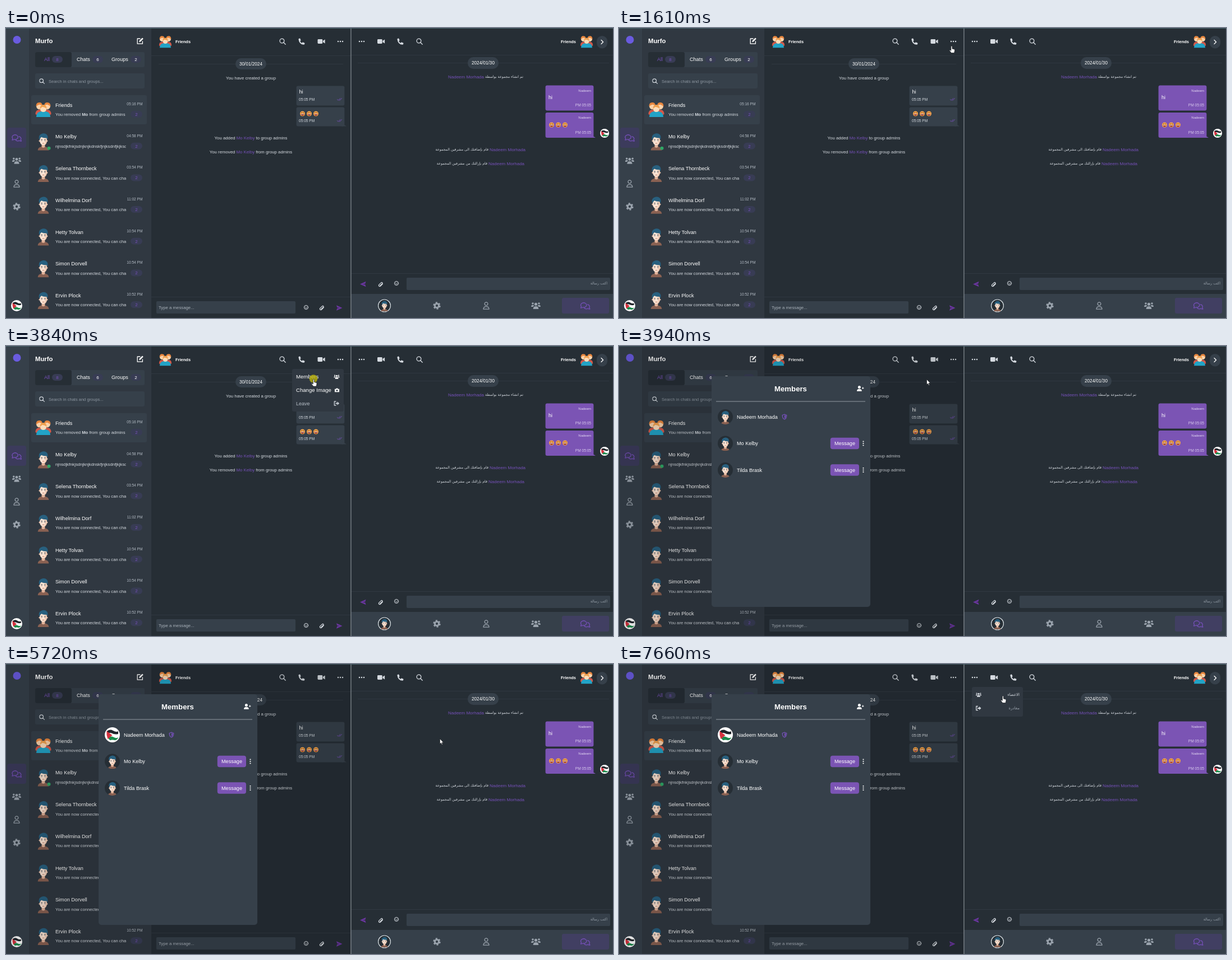
An HTML page for the animation above (8 s loop, 1082 by 518 pixels).

```html
<!DOCTYPE html>
<html lang="en">
<head>
<meta charset="utf-8">
<title>Chat windows</title>
<style>
html, body { margin: 0; width: 100%; height: 100%; overflow: hidden; background: #262e35; }
svg { display: block; width: 100vw; height: 100vh; font-family: "Liberation Sans", sans-serif; }
.arabic { direction: rtl; font-family: "DejaVu Sans", sans-serif; }
.line { fill: none; stroke: currentColor; stroke-width: 1.3; stroke-linejoin: round; stroke-linecap: round; }
.solid { fill: currentColor; }
</style>
</head>
<body>
<svg id="stage" viewBox="0 0 1082 518" preserveAspectRatio="none">
<defs>
  <clipPath id="disc"><circle r="13.5"/></clipPath>
  <clipPath id="preview"><rect x="88" y="100" width="126" height="410"/></clipPath>
  <g id="search" class="line"><circle cx="-1" cy="-1" r="3.9"/><path d="M2 2L5.2 5.2"/></g>
  <path id="phone" class="solid" d="M-5.7-4.6L-3-5.7-1.3-1.9-2.8-.6Q-1.8 1.7.6 2.8L1.9 1.3 5.7 3 4.6 5.7Q-4.6 6-5.7-4.6Z"/>
  <g id="video" class="solid"><rect x="-6.5" y="-4" width="8.7" height="8" rx="1.4"/><path d="M3-1.2L6.6-3.6V3.6L3 1.2Z"/></g>
  <g id="dots" class="solid"><circle cx="-4" r="1.25"/><circle r="1.25"/><circle cx="4" r="1.25"/></g>
  <g id="edit"><path class="line" d="M0-4H-4.8V5.2H4.4V.8"/><path class="solid" d="M-1.8 2.2L-1.2-.5 4-5.6 5.8-3.8.7 1.5Z"/></g>
  <g id="users" class="solid"><circle cy="-2.7" r="2.6"/><circle cx="-5.5" cy="-4" r="1.8"/><circle cx="5.5" cy="-4" r="1.8"/>
    <path d="M-4.8 6Q-4.8 1 0 1T4.8 6ZM-8.4 2Q-8.4-1.2-5.6-1.2T-3.2.3Q-4.6 1-5 2ZM8.4 2Q8.4-1.2 5.6-1.2T3.2.3Q4.6 1 5 2Z"/></g>
  <g id="user" class="line"><circle cy="-3.3" r="2.9"/><path d="M-5 6.2Q-5 1.6 0 1.6T5 6.2Z"/></g>
  <g id="gear" fill="none" stroke="currentColor"><circle r="3.6" stroke-width="2.9"/><circle r="5.6" stroke-width="2.2" stroke-dasharray="3.1 2.764"/></g>
  <g id="chats" class="line"><path d="M-8 4L-6.9 1.6A5.2 4.2 0 1 1-4.3 3Q-5.9 4-8 4ZM4-2.2A4.8 3.9 0 0 1 7.2 3.6L8.4 6Q6.2 6 4.8 5.2A5.2 4.2 0 0 1-1.8 4"/></g>
  <path id="clip" class="line" d="M3.4-1L-.5 3A1.8 1.8 0 0 1-3 .4L1-3.4A1.3 1.3 0 0 1 2.8-1.6L-1 2"/>
  <g id="smile"><circle r="3.6" class="line" style="stroke-width:1"/><path class="line" style="stroke-width:.8" d="M-1.7 1Q0 2.4 1.7 1"/><circle cx="-1.3" cy="-1" r=".55" class="solid"/><circle cx="1.3" cy="-1" r=".55" class="solid"/></g>
  <path id="send" class="solid" d="M-5-4.8L5.5 0-5 4.8-3.8.8 1 0-3.8-.8Z"/>
  <path id="check" class="line" style="stroke-width:.9" d="M-4 0L-2.3 1.8 1.4-2M-.5 1L.4 1.8 4-2"/>
  <g id="exit"><path class="line" d="M-1.6-3.5H-4.2V3.5H-1.6"/><path class="solid" d="M-2-1H1V-3.2L4.6 0 1 3.2V1H-2Z"/></g>
  <g id="camera"><path class="solid" d="M-4.5-2.5H-2L-1.3-3.8H1.3L2-2.5H4.5V3.7H-4.5Z"/><circle cy=".5" r="1.6" fill="#303841"/></g>
  <g id="adduser" class="solid"><circle cx="-1.6" cy="-2.5" r="2.5"/><path d="M-6 4.7Q-6 .7-1.6.7T2.8 4.7ZM3-1.2H4.2V-2.5H5.2V-1.2H6.5V-.2H5.2V1.1H4.2V-.2H3Z"/></g>
  <g id="shield"><path class="line" d="M0-4.3L3.8-3Q3.8 2.8 0 4.5-3.8 2.8-3.8-3Z"/><path class="solid" d="M0-3V3.3Q2.6 1.7 2.6-2.2Z"/></g>
  <g id="emoji"><circle r="4.5" fill="#f5a54a"/><path fill="#8d2a2a" d="M-3 .2H3Q2.5 3.4 0 3.4T-3 .2Z"/><path fill="#fff" d="M-2.6.3H2.6V1.2H-2.6Z"/><circle cx="-1.6" cy="-1.5" r=".8" fill="#5a3020"/><circle cx="1.6" cy="-1.5" r=".8" fill="#5a3020"/></g>
  <g id="man">
    <path fill="#8a6152" d="M-10 16Q-10 11-3.5 9.5H3.5Q10 11 10 16Z"/>
    <path fill="#e2b49b" d="M-3 4H3V10Q0 12.5-3 10Z"/>
    <ellipse cy="-1.5" rx="6.6" ry="8.2" fill="#fbe3d3"/>
    <circle cx="-6.8" cy="-1" r="1.3" fill="#f3cdb5"/><circle cx="6.8" cy="-1" r="1.3" fill="#f3cdb5"/>
    <path fill="#f0cbb4" d="M3-9Q7-8 6.6-1.5 6 6 1.5 6.6 4.5 2 3-9Z"/>
    <path fill="#28607f" d="M-7.4-3Q-9.6-11-4-13.5 2-16.5 6.4-12.5 9.4-9.5 7.4-3L6-6.5Q0-5.5-3.4-8-6-6.5-7.4-3Z"/>
    <path stroke="#33404d" stroke-width="1" fill="none" d="M-4.2-3.4H-1.6M1.6-3.4H4.2"/>
    <circle cx="-2.8" cy="-1.4" r=".7" fill="#33404d"/><circle cx="2.8" cy="-1.4" r=".7" fill="#33404d"/>
    <path stroke="#b5694f" stroke-width=".9" fill="none" d="M-1.6 3.3H1.6"/>
  </g>
  <g id="trio">
    <path fill="#d4594a" d="M-14 9Q-14 1-7 1H7Q14 1 14 9L10 11H-10Z"/>
    <circle cx="-7" cy="-5" r="5.4" fill="#fbd3ab"/><circle cx="7" cy="-5" r="5.4" fill="#fbd3ab"/>
    <path fill="#e8873f" d="M-13-5Q-13-13-6-12-2-12-1.6-6-6-9-8-8ZM13-5Q13-13 6-12 2-12 1.6-6 6-9 8-8Z"/>
    <path fill="#22a3c6" d="M-12.5 14Q-12.5 5-4 4H4Q12.5 5 12.5 14Z"/>
    <circle cy="-.5" r="5.6" fill="#fddcb9"/>
    <path fill="#f0a150" d="M-6-.5Q-6-8 0-8T6-.5Q3-3.8-2-4Z"/>
  </g>
  <g id="flag">
    <circle r="10" fill="#fff"/>
    <path fill="#20242a" d="M-7-5Q-3-8 1-5.6T7.8-4.6V-1.2Q3 0-1-2.2-4-3.5-7-1Z"/>
    <path fill="#198a4a" d="M-6 4Q-2 1 1.5 3T8 3.6Q6.5 7 3.5 7.2 0 6-3 7.2Z"/>
    <path fill="#d5323e" d="M-7.5-5L0 .6-6 5.5Q-8 0-7.5-5Z"/>
  </g>
</defs>
</svg>
<script>
const DARK = '#262e35', MID = '#303841', LIGHT = '#36404a';
const WHITE = '#fff', SOFT = '#d5dae0', GRAY = '#9aa3ad', PURPLE = '#7550b8', FILL = '#7b54b4', TINT = '#413f62';
const FRIEND = 'Mo Kelby', OWNER = 'Nadeem Morhada';
const stage = document.getElementById('stage');

const rect = (x, y, w, h, fill, r = 0, attrs = '') =>
  `<rect x="${x}" y="${y}" width="${w}" height="${h}" rx="${r}" fill="${fill}" ${attrs}/>`;
const circle = (x, y, r, fill) => `<circle cx="${x}" cy="${y}" r="${r}" fill="${fill}"/>`;
// y is the visual middle of the line
const text = (x, y, s, size, fill = WHITE, attrs = '') =>
  `<text x="${x}" y="${y + size * .36}" font-size="${size}" fill="${fill}" ${attrs}>${s}</text>`;
const MIDDLE = 'text-anchor="middle" ', END = 'text-anchor="end" ', BOLD = 'font-weight="bold" ', ARABIC = 'class="arabic" ';
const icon = (id, x, y, color = SOFT, scale = 1, flip = 1) =>
  `<use href="#${id}" transform="translate(${x} ${y}) scale(${scale * flip} ${scale})" color="${color}"/>`;
const hline = (x1, x2, y, color = LIGHT) => rect(x1, y, x2 - x1, 1, color);
const group = (id, content) => `<g id="${id}">${content}</g>`;
const link = s => `<tspan fill="${PURPLE}">${s}</tspan>`;
const portrait = (x, y) => `<g transform="translate(${x} ${y})">${circle(0, 0, 13.5, DARK)}<g clip-path="url(#disc)">${icon('man', 0, 1, WHITE, .78)}</g></g>`;

function sidebar() {
  const chat = ([name, time, preview], i) => {
    const y = 146 + i * 56.7;
    return (i ? icon('man', 66.5, y, WHITE, .98) : rect(45, 120, 206, 52, LIGHT, 3) + icon('trio', 66.5, y - 1, WHITE, 1)) +
      (i === 1 ? circle(76.5, y + 12, 3, '#2fa866') : '') +
      text(88, y - 8.5, name, 9.1) + text(243.5, y - 10.5, time, 6.6, '#b4bcc5', END) +
      text(88, y + 8.5, preview, 7.7, SOFT, 'clip-path="url(#preview)"') +
      rect(222, y + 2, 21, 12, '#383c54', 6) + text(232.5, y + 8, '2', 8, PURPLE, MIDDLE);
  };
  const tab = (x, label, badge, count, color) =>
    text(x, 56, label, 9.1, color) + rect(badge, 50, 19, 12, '#383c54', 6) + text(badge + 9.5, 56, count, 8, color, MIDDLE);
  const connected = 'You are now connected, You can chat';
  const chats = [
    ['Friends', '05:16 PM', 'You removed <tspan font-weight="bold">Mo</tspan> from group admins'],
    [FRIEND, '04:58 PM', 'njnsdjkfnkjsdnjknjkdnskfjnjksdnfjkjksdn'],
    ['Selena Thornbeck', '03:54 PM', connected],
    ['Wilhelmina Dorf', '11:02 PM', connected],
    ['Hetty Tolvan', '10:54 PM', connected],
    ['Simon Dorvell', '10:54 PM', connected],
    ['Ervin Plock', '10:52 PM', connected]];
  return rect(0, 0, 41, 518, LIGHT) + rect(41, 0, 218, 518, MID) +
    circle(19.5, 21, 7, '#6a5be0') + rect(2, 178, 34, 36, '#3c3b5c', 4) + icon('chats', 19, 196, PURPLE) +
    icon('users', 19, 237, GRAY, .95) + icon('user', 19, 278, GRAY) + icon('gear', 19, 319, GRAY) + icon('flag', 19, 496) +
    text(52, 23, 'Murfo', 11.3, WHITE, BOLD) + icon('edit', 239, 23, WHITE) +
    rect(52, 43, 195, 27, LIGHT, 3) + rect(52, 43, 65, 27, DARK, 3) +
    tab(68, 'All', 82, 8, PURPLE) + tab(126, 'Chats', 154, 6, WHITE) + tab(188, 'Groups', 222, 2, WHITE) +
    rect(52, 81, 195, 27, LIGHT, 3) + icon('search', 64, 95, SOFT, .85) + text(76, 95, 'Search in chats and groups...', 7.5, '#8d96a0') +
    chats.map(chat).join('');
}

function bubble(x, y, h, fill, tail) {
  return rect(x - .4, y - .4, 85.8, h + .8, fill, 3) +
    (tail ? `<path d="M${x + 80} ${y + h - 5}L${x + 89} ${y + h + .4}H${x + 80}Z" fill="${fill}"/>` : '');
}
const laughs = (x, y) => [0, 12, 24].map(dx => icon('emoji', x + dx, y)).join('');

function leftChat() {
  const stamp = y => text(522, y, '05:05 PM', 6.6, SOFT) + icon('check', 594.5, y - .5, PURPLE);
  return rect(259, 0, 356, 518, DARK) + icon('trio', 284, 24, WHITE, .8) + text(302, 24, 'Friends', 7.5, WHITE, BOLD) +
    icon('search', 493, 24) + icon('phone', 527, 24) + icon('video', 562, 24) + icon('dots', 596, 24) +
    hline(259, 615, 49, MID) + hline(272, 601, 64, MID) + rect(409, 54, 55, 20, LIGHT, 10) + text(436.5, 64, '30/01/2024', 8.2, WHITE, MIDDLE) +
    text(436.5, 89, 'You have created a group', 7.8, SOFT, MIDDLE) +
    bubble(518, 104, 34, LIGHT) + text(522.5, 114, 'hi', 9) + stamp(128) +
    bubble(518, 142, 33, LIGHT, true) + laughs(528.5, 153) + stamp(166) +
    text(436.5, 196.5, `You added ${link(FRIEND)} to group admins`, 7.8, SOFT, MIDDLE) +
    text(436.5, 221.5, `You removed ${link(FRIEND)} from group admins`, 7.8, SOFT, MIDDLE) +
    hline(259, 615, 480, MID) + rect(268, 488, 248, 22, LIGHT, 2) + text(272, 499, 'Type a message...', 7.8, '#a9b1ba') +
    icon('smile', 535, 499) + icon('clip', 563, 500) + icon('send', 594, 500, '#6b36a0');
}

function rightChat() {
  const stamp = y => text(1043, y, 'PM 05:05', 6.6, '#d9cbee', END);
  const sender = y => text(1043, y, 'Nadeem', 6, '#e3d8f2', END);
  return rect(615, 0, 467, 518, DARK) +
    icon('dots', 634, 24) + icon('video', 668.5, 24) + icon('phone', 703, 24) + icon('search', 737, 24) +
    text(1016, 24.5, 'Friends', 7.5, WHITE, BOLD + END) + icon('trio', 1035, 24, WHITE, .8) + rect(1053, 14, 19, 22.5, LIGHT, 9.5) +
    `<path class="line" color="#fff" d="M1061 21.5L1064.5 25 1061 28.5"/>` +
    hline(615, 1082, 48, MID) + hline(627, 1075, 62, MID) + rect(823, 52, 55, 21, LIGHT, 10) + text(850.5, 62.5, '2024/01/30', 8.2, WHITE, MIDDLE) +
    text(852, 87.5, OWNER, 8, PURPLE, END) + text(854, 87, 'تم انشاء مجموعة بواسطة', 6.3, SOFT, ARABIC + END) +
    bubble(962, 103, 44, FILL) + sender(111.5) + text(967, 124, 'hi', 9) + stamp(138) +
    bubble(962, 151.5, 44, FILL, true) + sender(160) + laughs(972.5, 173) + stamp(187) + icon('flag', 1067, 188, WHITE, .8) +
    text(860, 216.5, 'قام بإضافتك الى مشرفين المجموعة', 6.3, SOFT, ARABIC) + text(862, 217, OWNER, 8, PURPLE) +
    text(858, 241.5, 'قام بإزالتك من مشرفين المجموعة', 6.3, SOFT, ARABIC) + text(860, 242, OWNER, 8, PURPLE) +
    hline(615, 1082, 438, MID) + icon('send', 636.5, 457.5, '#6b36a0', 1, -1) + icon('clip', 668, 458) + icon('smile', 696, 456) +
    rect(714, 446, 363, 22, LIGHT, 2) + text(1072, 456, 'اكتب رسالة', 6.3, GRAY, ARABIC) +
    rect(615, 475, 467, 43, LIGHT) + circle(674.5, 496, 11.5, '#dfe6ea') + circle(674.5, 496, 10.4, DARK) + icon('man', 674.5, 496.5, WHITE, .6) +
    icon('gear', 768, 496, GRAY) + icon('user', 856, 496, GRAY) + icon('users', 944.5, 496, GRAY) +
    rect(991, 482, 84, 28, TINT, 3) + icon('chats', 1032.5, 496, PURPLE);
}

function modal() {
  const member = (y, name) => portrait(189.5, y) + text(210, y, name, 9.1) + rect(376.8, y - 10.3, 51.2, 20.6, FILL, 4) +
    text(402.5, y, 'Message', 9.1, WHITE, MIDDLE) + [-3.5, 0, 3.5].map(d => circle(435.5, y + d, 1.1, WHITE)).join('');
  return rect(0, 0, 614, 518, '#000', 0, 'opacity=".12"') +
    rect(165, 54, 283, 412, LIGHT, 5) + rect(168, 0, 278, 41, MID, 4, 'id="hover"') +
    text(306, 76, 'Members', 13.2, WHITE, BOLD + MIDDLE) + icon('adduser', 430, 76, WHITE) + hline(173, 439, 98.5, '#929aa2') +
    portrait(189.5, 126.5) + group('ownerFlag', icon('flag', 189.5, 126.5, WHITE, 1.35)) +
    text(210, 126.5, OWNER, 9.1) + icon('shield', 295, 126.5, PURPLE) +
    member(174, FRIEND) + member(221.5, 'Tilda Brask');
}

const leftMenu = () => rect(510, 41, 92, 76, MID, 3) +
  text(517, 55, 'Members', 9.7) + icon('users', 589.5, 55, WHITE, .62) +
  text(517, 79, 'Change Image', 9.6) + icon('camera', 590, 79, WHITE, .9) +
  text(517, 102.5, 'Leave', 9, '#b6bec7') + icon('exit', 589.5, 102.5, '#c6ccd3');
const rightMenu = () => rect(629, 41, 91, 53, MID, 3) +
  icon('users', 641, 55, SOFT, .62) + text(714, 54.5, 'الاعضاء', 7, SOFT, ARABIC) +
  icon('exit', 641, 79, SOFT) + text(714, 78, 'مغادرة', 7, GRAY, ARABIC);

const handPath = 'M-1.2 .8Q0-.8 1 .8V5L5 6Q5.8 6.6 5.4 9L4.6 12.6H-.6L-3.8 8.4Q-3.8 6.8-2.4 7.4L-1.2 8.4Z';
const arrowPath = 'M0 0V9.4L2.1 7.6 3.6 10.8 5 10.2 3.6 7H6.5Z';
const outline = (id, d) => `<path id="${id}" d="${d}" fill="#fff" stroke="#15181c" stroke-width=".7"/>`;

stage.innerHTML += sidebar() + leftChat() + rightChat() +
  rect(614.3, 0, 1.2, 518, '#858d93') + hline(0, 1082, 0, '#47616a') +
  group('leftMenu', leftMenu()) + group('modal', modal()) + group('rightMenu', rightMenu()) +
  '<circle id="click" r="7.3" fill="#b9b007" opacity=".8"/>' + group('clickDots', icon('dots', 634, 24)) +
  group('cursor', outline('hand', handPath) + outline('arrow', arrowPath));

const part = Object.fromEntries(['leftMenu', 'modal', 'hover', 'ownerFlag', 'rightMenu', 'click', 'clickDots', 'cursor', 'hand', 'arrow']
  .map(id => [id, document.getElementById(id)]));
const show = (id, on) => part[id].setAttribute('display', on ? 'inline' : 'none');
const within = (t, spans) => spans.some(([from, to]) => t >= from && t < to);

// time, x, y of the pointer tip
const path = [[540, 968, 505], [750, 671, 340], [1000, 671, 340], [1420, 576, 72], [1610, 593, 32], [1760, 593, 31],
  [1910, 593, 31], [1960, 593, 28], [3030, 593, 28], [3430, 548.5, 59.5], [4350, 548.5, 59.5], [4720, 312, 112],
  [4900, 290.5, 126], [5150, 233, 257], [5200, 233, 257], [5310, 420, 276], [5470, 774, 134], [5720, 774, 134],
  [5920, 651, 11], [6070, 651, 11], [6390, 637, 26], [7040, 637, 26], [7210, 663, 61], [7560, 663, 61], [7660, 684.5, 57]];

function pointerAt(t) {
  const i = path.findIndex(p => p[0] > t);
  if (i < 0) return path.at(-1).slice(1);
  if (i === 0) return path[0].slice(1);
  const [t0, x0, y0] = path[i - 1], [t1, x1, y1] = path[i], k = (t - t0) / (t1 - t0);
  return [x0 + (x1 - x0) * k, y0 + (y1 - y0) * k];
}

function draw(t) {
  const [x, y] = pointerAt(t), open = t >= 3940;
  const row = [106, 153.5, 201].find(top => y >= top && y < top + 41);
  const hovering = open && x > 168 && x < 446 && row !== undefined;
  const hand = within(t, [[1560, 3940], [6250, 8000]]) || hovering;
  show('leftMenu', t >= 2520 && !open);
  show('modal', open);
  show('ownerFlag', t >= 4040);
  show('hover', hovering);
  if (hovering) part.hover.setAttribute('y', row);
  show('rightMenu', t >= 6840);
  show('click', within(t, [[2420, 2520], [3840, 3940], [6690, 6840]]));
  show('clickDots', within(t, [[6690, 6840]]));
  part.click.setAttribute('cx', x - .5);
  part.click.setAttribute('cy', y - 1);
  show('cursor', t >= 540);
  show('hand', hand);
  show('arrow', !hand);
  part.cursor.setAttribute('transform', `translate(${x} ${y})`);
}

const start = performance.now();
function tick() {
  draw((performance.now() - start) % 8000);
  requestAnimationFrame(tick);
}
tick();
</script>
</body>
</html>
```
